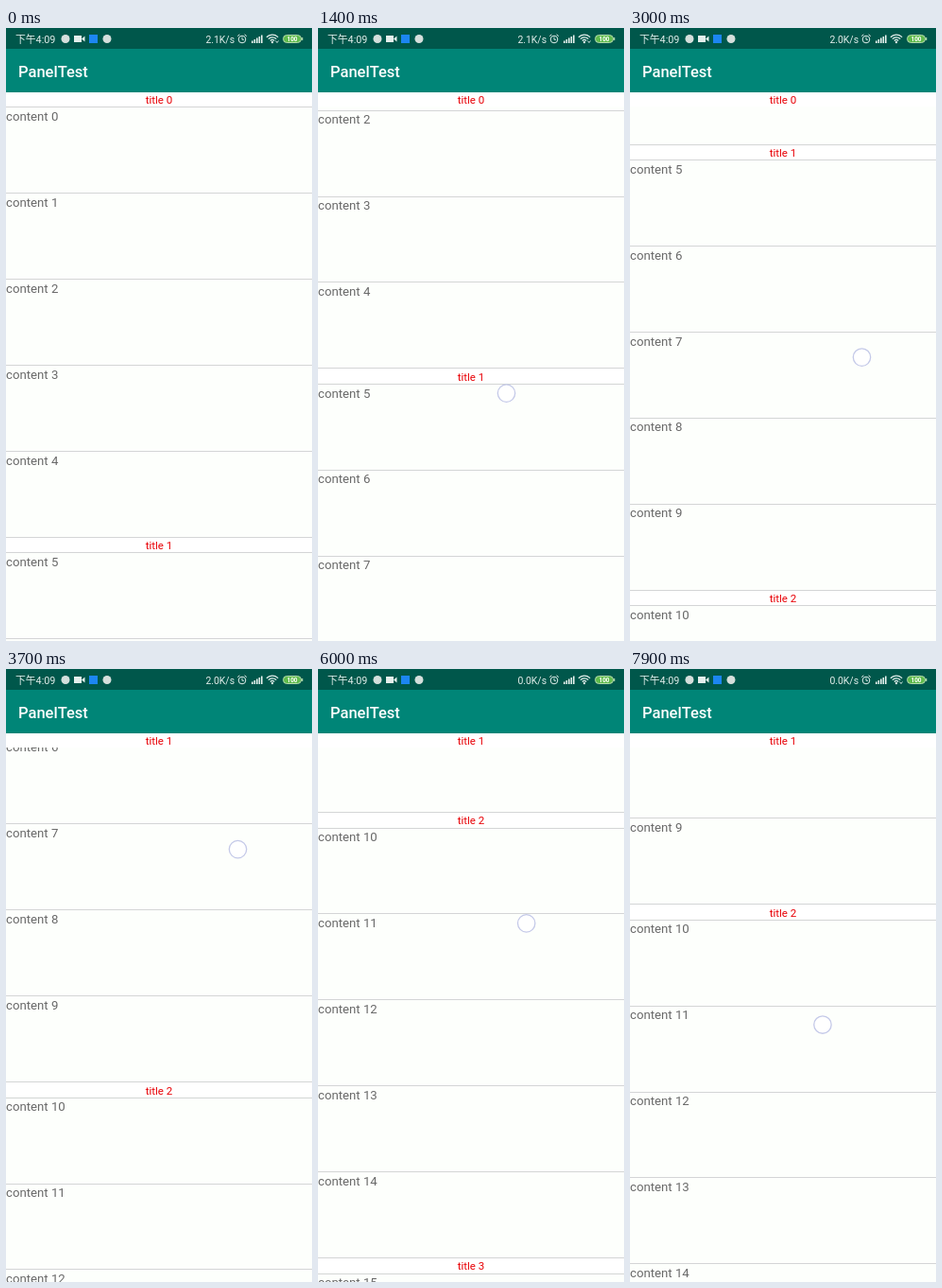
Animation of 324x648 px, one loop 8000 ms. Source, as an HTML page with a canvas:

```html
<!DOCTYPE html>
<html lang="en">
<head>
<meta charset="utf-8">
<title>Sticky list</title>
<style>
html, body { margin: 0; width: 100%; height: 100%; overflow: hidden; background: #fdfffc; }
canvas { display: block; width: 324px; height: 648px; }
</style>
</head>
<body>
<canvas id="stage" width="324" height="648"></canvas>
<script>
const ctx = document.getElementById('stage').getContext('2d');
const W = 324, H = 648, LOOP = 8000, STEP = 100;
const TOP = 67.2, TITLE_H = 16.5, ROW_H = 90.9, PER_GROUP = 5;
const GROUP_H = TITLE_H + ROW_H * PER_GROUP;
const PAPER = '#fdfffc';

// [time, scroll offset]
const scrollKeys = [
  [0, 0], [610, 0], [2200, 360], [2700, 360], [3600, 572.6], [4050, 572.6],
  [5000, 942], [5100, 942], [6800, 787], [7900, 760.5], [8000, 760.5]
];

// finger: start, end, x range, list position range
const touches = [
  [500, 2250, 199.5, 199.5, 564.4, 564.4],
  [2600, 3900, 245.5, 245.5, 763.2, 763.2],
  [4000, 5100, 240, 240, 1126, 1126],
  [5100, 6800, 240, 203.5, 1126, 1127],
  [6800, 8000, 203.5, 204, 1127, 1137.4]
];

const mix = (a, b, u) => a + (b - a) * u;
const smooth = u => u * u * (3 - 2 * u);

function scrollAt(t) {
  const i = scrollKeys.findIndex(k => k[0] > t);
  const [t0, a] = scrollKeys[i - 1], [t1, b] = scrollKeys[i];
  return mix(a, b, smooth((t - t0) / (t1 - t0)));
}

function rect(x, y, w, h, color) {
  ctx.fillStyle = color;
  ctx.fillRect(x, y, w, h);
}

function text(str, x, y, font, color, align = 'left') {
  ctx.font = font;
  ctx.fillStyle = color;
  ctx.textAlign = align;
  ctx.fillText(str, x, y);
}

function disc(x, y, r, color) {
  ctx.fillStyle = color;
  ctx.beginPath();
  ctx.arc(x, y, r, 0, Math.PI * 2);
  ctx.fill();
}

function stroke(points, color, width = 1) {
  ctx.strokeStyle = color;
  ctx.lineWidth = width;
  ctx.beginPath();
  points.forEach(([x, y], i) => i ? ctx.lineTo(x, y) : ctx.moveTo(x, y));
  ctx.stroke();
}

function arc(x, y, r, from, to, color, width) {
  ctx.strokeStyle = color;
  ctx.lineWidth = width;
  ctx.beginPath();
  ctx.arc(x, y, r, from, to);
  ctx.stroke();
}

const divider = y => rect(0, Math.floor(y), W, 1, '#d4d5d6');

function groupTitle(n, y) {
  rect(0, Math.floor(y) + 1, W, 15, '#fff');
  text('title ' + n, W / 2, Math.round(y + 12.9), '11.55px Roboto, sans-serif', '#e80006', 'center');
}

function drawList(scroll) {
  const first = Math.floor(scroll / GROUP_H);
  for (let g = first; g < first + 3; g++) {
    const y = TOP + g * GROUP_H - scroll;
    groupTitle(g, y);
    divider(y);
    for (let i = 0; i < PER_GROUP; i++) {
      const top = y + TITLE_H + i * ROW_H;
      divider(top);
      text('content ' + (g * PER_GROUP + i), 0, Math.round(top + 14.2),
        '13.2px Roboto, sans-serif', '#686868');
    }
  }
  // pinned title, pushed up by the next one
  const next = TOP + (first + 1) * GROUP_H - scroll;
  groupTitle(first, Math.min(TOP, next - TITLE_H));
}

function drawTouch(t, scroll) {
  const hit = touches.find(k => t >= k[0] && t < k[1]);
  if (!hit) return;
  const [t0, t1, x0, x1, p0, p1] = hit, u = (t - t0) / (t1 - t0);
  const x = mix(x0, x1, u), y = mix(p0, p1, u) - scroll;
  disc(x, y, 9, '#fff');
  arc(x, y, 9.2, 0, Math.PI * 2, '#c4c9e8', 1.3);
}

function drawStatus(t) {
  const ink = '#e4efec';
  rect(0, 0, W, 22, '#00574b');
  text('下午4:09', 10, 15.5, '10.8px Roboto, "Noto Sans CJK SC", "Noto Sans CJK", sans-serif', ink);
  disc(63, 11.5, 4.5, '#d5dfdc');
  disc(107, 11.5, 4.5, '#d5dfdc');
  rect(72, 8, 8, 7, ink);
  ctx.beginPath();
  ctx.moveTo(80, 11.5);
  ctx.lineTo(83.5, 8.5);
  ctx.lineTo(83.5, 14.5);
  ctx.fill();
  rect(88, 7, 9, 9, '#1c86f2');

  const speed = t < 2000 ? '2.1' : t < 5600 ? '2.0' : '0.0';
  text(speed + 'K/s', 242, 15.5, '10.4px Roboto, sans-serif', ink, 'right');

  // alarm clock
  arc(250, 12, 3.8, 0, Math.PI * 2, ink, 1);
  stroke([[250, 9.5], [250, 12.3], [252, 12.3]], ink, 0.9);
  stroke([[245.2, 8.6], [247.4, 6.8]], ink);
  stroke([[254.8, 8.6], [252.6, 6.8]], ink);

  for (let i = 0; i < 5; i++) rect(260 + i * 2.5, 13.5 - i * 1.5, 1.6, 2.5 + i * 1.5, ink);

  // wifi
  for (const r of [3, 5.7, 8.4]) arc(282, 15.5, r, -Math.PI * 0.76, -Math.PI * 0.24, ink, 1.3);
  disc(282, 15, 1.2, ink);
  if (t < 3000 || t >= 7000) {
    stroke([[285.5, 13.5], [287, 15.5], [288.5, 13.5]], ink, 0.9);
  }

  // battery
  ctx.fillStyle = '#5fbb4c';
  ctx.strokeStyle = '#b5dcb0';
  ctx.lineWidth = 1;
  ctx.beginPath();
  ctx.roundRect(293.5, 7.5, 19, 8, 4);
  ctx.fill();
  ctx.stroke();
  rect(313, 10, 1.3, 3, '#b5dcb0');
  text('100', 303, 14, 'bold 6.5px Roboto, sans-serif', '#fff', 'center');
}

function draw(t) {
  const scroll = scrollAt(t);
  rect(0, 0, W, H, PAPER);
  drawList(scroll);
  rect(0, 22, W, 46, '#008577');
  text('PanelTest', 13, 52, '500 16.5px Roboto, sans-serif', '#fff');
  drawStatus(t);
  drawTouch(t, scroll);
}

const start = performance.now();
function frame() {
  const t = (performance.now() - start) % LOOP;
  draw(Math.floor(t / STEP) * STEP);
  requestAnimationFrame(frame);
}
frame();
</script>
</body>
</html>
```
